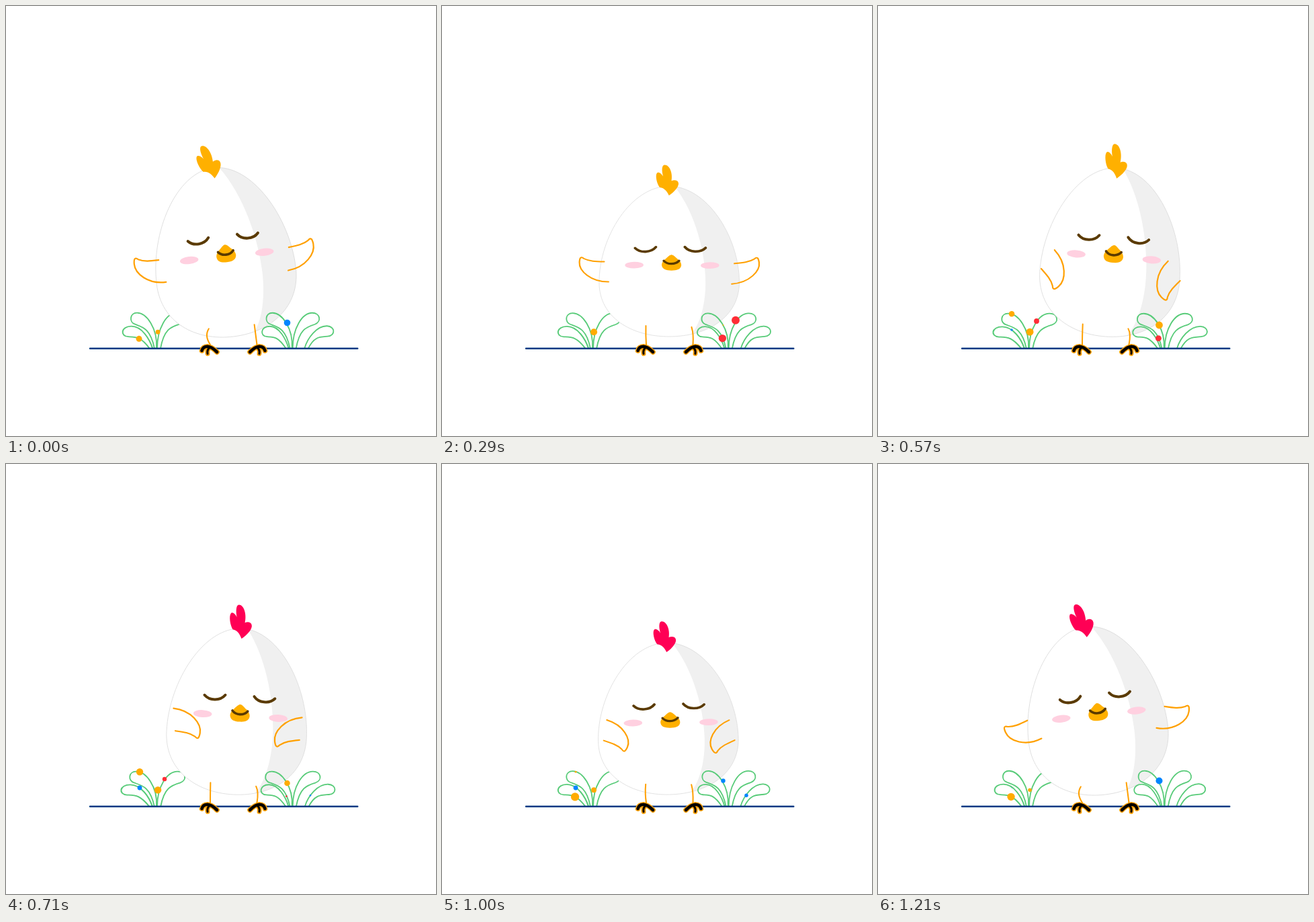
Animation of 640x640 px, one loop 1.28 s. Source, as an HTML page with a canvas:

```html
<!DOCTYPE html>
<html lang="en">
<head>
<meta charset="utf-8">
<title>Dancing hen</title>
<style>
html, body { margin: 0; height: 100%; overflow: hidden; background: #fff; }
canvas { display: block; }
</style>
</head>
<body>
<canvas id="stage" width="640" height="640"></canvas>
<script>
const ctx = document.getElementById('stage').getContext('2d');
const LOOP = 1280, STEPS = 18, RAD = Math.PI / 180;
const BASE_X = 338.5, BASE_Y = 492, GROUND = 509.7;
const ORANGE = '#ffa000', GOLD = '#ffb000', RED = '#ff0055', BROWN = '#5a3a00';
const PINK = '#ffd0e0', GREEN = '#57cb78', NAVY = '#003a84';
const BERRY = { gold: '#ffab00', red: '#ff2d36', blue: '#0085ff' };

// x, y, colour, largest radius, step of the largest size, steps until gone
const LEFT_BERRIES = [
  [198, 495.3, 'gold', 6.5, 15.2, 5],
  [226, 485.2, 'gold', 5.5, 7.5, 12],
  [199, 458.2, 'gold', 5.2, 10, 4.7],
  [236, 469, 'red', 4, 8.5, 3.4],
  [199, 482, 'blue', 4, 12, 5.3]
];
const RIGHT_BERRIES = [
  [418.5, 471.5, 'blue', 5, 17, 5],
  [418.5, 475, 'gold', 5.4, 8, 4.4],
  [437, 467.8, 'red', 6, 3.8, 3.8],
  [417.4, 494.6, 'red', 6, 5.3, 5.3],
  [453, 493.3, 'blue', 2.9, 13, 4]
];

const LEAF = {
  upLeft: 'M-1 0C1-30-16-53-30-53C-41-53-42-39-33-36C-22-32-10-30-4 0',
  lowLeft: 'M-6 0C-10-14-20-33-34-33C-48-33-49-18-38-17.5C-28-17-22-18-10 0',
  upRight: 'M0 0C0-30 14-53 29-53C41-53 43-40 33-36C20-32 10-28 5 0',
  lowRight: 'M17.5 0C22-16 36-34 51-33.5C63-33 64-19 52-18C40-17 32-18 23 0'
};
// The body stands on 0,0 and is 250 high
const EGG = 'M0-250C57-250 104.3-165 104.3-90C104.3-32.5 57 0 0 0' +
  'C-57 0-104.3-32.5-104.3-90C-104.3-165-57-250 0-250Z';
const SHADE = 'M8-250C40-205 54-137.5 54-90C54-50 44-15 29 0L120 0L120-250Z';
const COMB = 'M0 0C-2-6-6-13-13-14C-17-20-19-34-16-38C-14-41-9-37-7-32' +
  'C-9-42-8-51-4-51C3-51 8-38 5-24C9-26 14-25 15-21C17-15 8-5 0 0Z';
const WING = 'M0 0C20-18 45-16 54-5C58 0 60 4 53 4C44 6 37 12 27.3 20.4';
const BEAK = 'M0-13.3C3-13.3 6-9 9-6.5C12-4 15 0 14.5 4.5C13.5 11 8 12.7 0 12.7' +
  'C-8 12.7-13.5 11-14.5 4.5C-15 0-12-4-9-6.5C-6-9-3-13.3 0-13.3Z';
const EYE = 'M-15.5-3C-8 6 8 6 15.5-3';
const MOUTH = 'M-11.5-3.5C-6 3.3 5.5 3.3 11.3-3.5';
const TOES = 'M291.5 513Q293 507 300 506.8Q306 507 314 515';
const MID_TOE = 'M302.5 509Q299 512 300 517.5';

// Cosine of a wave that runs n times per loop and peaks at the given step
const wave = (k, n, peak = 0) => Math.cos((k - peak) * n * 2 * Math.PI / STEPS);
const ease = t => t < 0.5 ? 4 * t ** 3 : 1 - 4 * (1 - t) ** 3;

const lean = k =>
  -0.8 - 4.7 * wave(k, 1, -0.5) - 0.6 * wave(k, 2, -0.5) - 0.9 * wave(k, 3, -0.5);
const squash = k => 0.954 + 0.059 * wave(k, 2, -0.3);
const combTilt = k => -5.5 - 5.5 * wave(k, 3);

// Wings fold between steps 2.3 and 11.6, then open until step 1.6
function flap(k) {
  const fold = 2.3, open = 11.6, end = STEPS + 1.6;
  const j = k < 1.6 ? k + STEPS : k;
  const t = j < open
    ? ease(Math.max(0, (j - fold) / (open - fold)))
    : 1 - ease(Math.min(1, (j - open) / (end - open)));
  return 227 - 185 * t;
}

function stroke(d, color, width) {
  ctx.strokeStyle = color;
  ctx.lineWidth = width;
  ctx.stroke(new Path2D(d));
}

function fill(d, color) {
  ctx.fillStyle = color;
  ctx.fill(new Path2D(d));
}

function oval(x, y, rx, ry, color) {
  ctx.fillStyle = color;
  ctx.beginPath();
  ctx.ellipse(x, y, rx, ry, 0, 0, 2 * Math.PI);
  ctx.fill();
}

function group(x, y, deg, sx, sy, paint) {
  ctx.save();
  ctx.translate(x, y);
  ctx.rotate(deg * RAD);
  ctx.scale(sx, sy);
  paint();
  ctx.restore();
}

function bush(x, spread, lowScale, leaves, berries, k) {
  group(x, GROUND, 0, 1 + 0.045 * spread, 1 - 0.02 * spread, () => {
    for (const name of leaves) stroke(LEAF[name], GREEN, 1.8);
    ctx.scale(lowScale, 1);
    stroke(LEAF.lowLeft, GREEN, 1.8);
  });
  for (const [bx, by, color, size, peak, fade] of berries) {
    const gap = Math.abs(k - peak);
    const d = Math.min(gap, STEPS - gap) / fade;
    const r = size * Math.max(0, 1 - d * d);
    oval(bx, by, r, r, BERRY[color]);
  }
}

function wing(x, y, side, deg) {
  group(x, y, 0, side, 1, () => {
    ctx.rotate(deg * RAD);
    ctx.translate(-13.6, -10.2);
    stroke(WING, ORANGE, 2.2);
  });
}

function body(k) {
  group(BASE_X, BASE_Y, lean(k), 1, squash(k), () => {
    fill(EGG, '#fff');
    ctx.save();
    ctx.clip(new Path2D(EGG));
    fill(SHADE, '#f0f0f0');
    ctx.restore();
    stroke(EGG, '#dadada', 0.8);
    group(0, -234.5, combTilt(k), 1, 1, () => fill(COMB, k < STEPS / 2 ? GOLD : RED));
    group(-35, -145, -3, 1, 1, () => stroke(EYE, BROWN, 4));
    group(38.7, -145, 3, 1, 1, () => stroke(EYE, BROWN, 4));
    oval(-52, -119, 13.8, 5.5, PINK);
    oval(60.7, -118, 13.8, 5.5, PINK);
    group(3.5, -122.5, 0, 1, 1, () => {
      fill(BEAK, GOLD);
      stroke(MOUTH, BROWN, 3.6);
    });
    wing(-93.5, -108, 1, flap(k));
    wing(95, -104, -1, flap(k) + 4);
  });
}

function legs(k) {
  const a = lean(k), c = Math.cos(a * RAD), s = Math.sin(a * RAD);
  const hip = (x, y) => `M${BASE_X + x * c - y * s} ${BASE_Y + y * c + x * s}`;
  stroke(`${hip(-35, -16)}Q${Math.min(304, 303.3 + 1.2 * a)} 491 304 504`, ORANGE, 2);
  stroke(`${hip(33, -14)}Q${374.8 + 0.5 * a} 488 373.5 504`, ORANGE, 2);
}

function foot() {
  stroke(TOES, ORANGE, 7.6);
  stroke(MID_TOE, ORANGE, 6.8);
  stroke(TOES, '#000', 4.6);
  stroke(MID_TOE, '#000', 3);
}

function draw(k) {
  ctx.fillStyle = '#fff';
  ctx.fillRect(0, 0, 640, 640);
  ctx.lineCap = ctx.lineJoin = 'round';
  const spread = peak => 0.5 + 0.5 * wave(k, 1, peak);
  bush(225, spread(9), 1.13, ['upLeft', 'upRight'], LEFT_BERRIES, k);
  body(k);
  bush(426.7, spread(7.5), 1, ['upLeft', 'upRight', 'lowRight'], RIGHT_BERRIES, k);
  stroke(`M125 ${GROUND}H523.3`, NAVY, 2.4);
  legs(k);
  foot();
  group(2 * BASE_X, 0, 0, -1, 1, foot);
}

let start;
function tick(now) {
  start ??= now;
  const t = (now - start) % LOOP;
  draw(Math.floor((t + 3) * STEPS / LOOP) % STEPS);
  requestAnimationFrame(tick);
}
requestAnimationFrame(tick);
</script>
</body>
</html>
```
